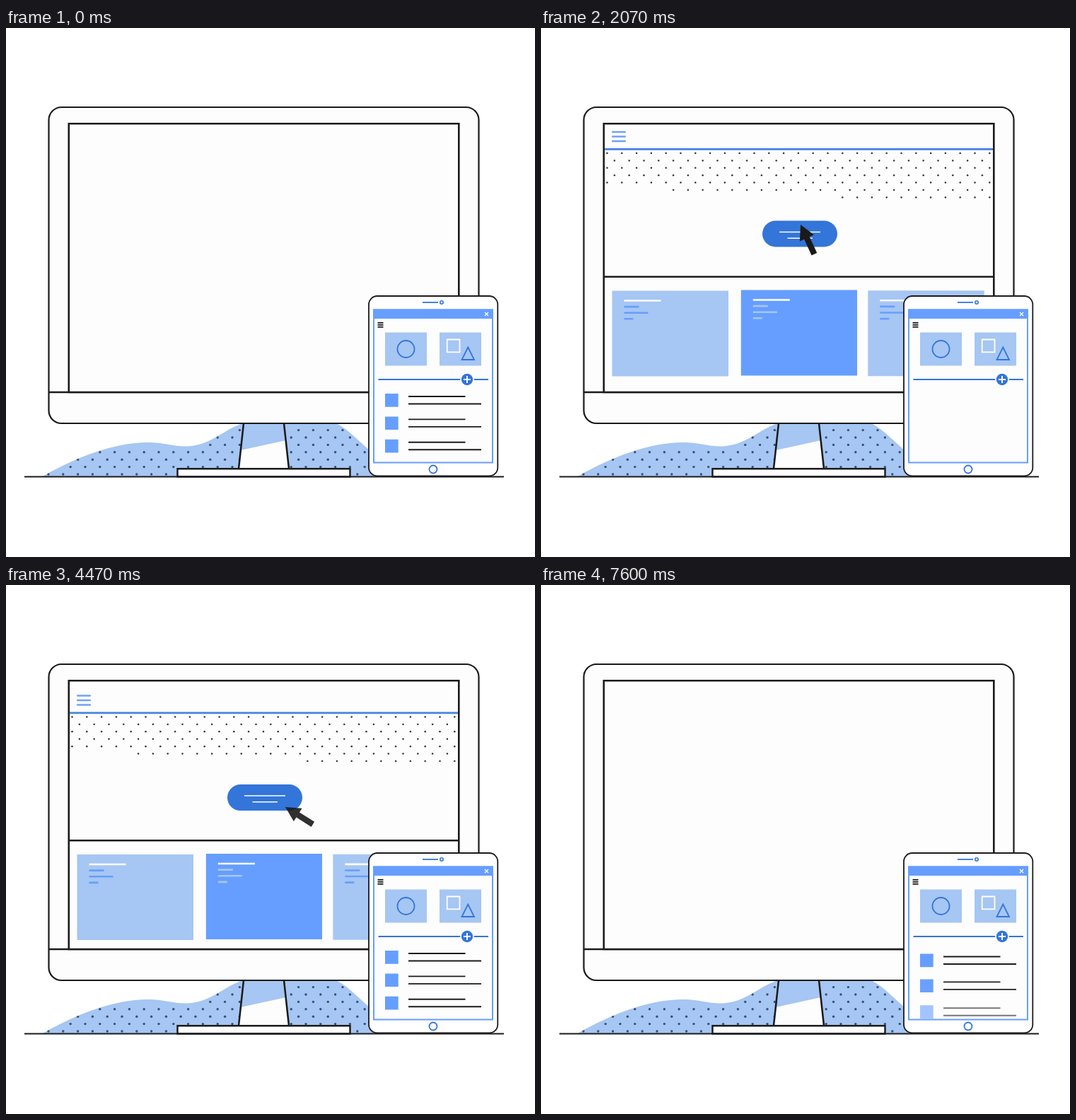
An HTML page with a canvas that plays this animation: 748 by 748 pixels, repeating every 7.66 s.

```html
<!DOCTYPE html>
<html lang="en">
<head>
<meta charset="utf-8">
<title>Desktop and tablet</title>
<style>
html, body { margin: 0; height: 100%; overflow: hidden; background: #fff; }
canvas { display: block; width: 748px; height: 748px; }
</style>
</head>
<body>
<canvas width="748" height="748"></canvas>
<script>
const ctx = document.querySelector('canvas').getContext('2d');
const LOOP = 7660, HALF = 3870;
const INK = '#1a1a1a', BLUE = '#669eff', PALE = '#a6c6f3', DEEP = '#3375d9', PAPER = '#fdfdfd';

const clamp = v => Math.min(1, Math.max(0, v));
const ramp = (t, from, to) => clamp((t - from) / (to - from));
const backOut = p => 1 + 2.70158 * (p - 1) ** 3 + 1.70158 * (p - 1) ** 2;

function paint(path, fill, stroke, width = 2) {
  if (fill) { ctx.fillStyle = fill; ctx.fill(path); }
  if (stroke) { ctx.strokeStyle = stroke; ctx.lineWidth = width; ctx.stroke(path); }
}
function box(x1, y1, x2, y2, fill, stroke, width, radius = 0) {
  const p = new Path2D();
  p.roundRect(x1, y1, x2 - x1, y2 - y1, radius);
  paint(p, fill, stroke, width);
}
function disc(x, y, r, fill, stroke, width) {
  const p = new Path2D();
  p.arc(x, y, r, 0, 7);
  paint(p, fill, stroke, width);
}
const shape = (d, fill, stroke, width) => paint(new Path2D(d), fill, stroke, width);
const rule = (x1, x2, y, color, width) => shape(`M${x1} ${y}H${x2}`, null, color, width);

function clipped(x1, y1, x2, y2, draw) {
  ctx.save();
  ctx.beginPath();
  ctx.rect(x1, y1, x2 - x1, y2 - y1);
  ctx.clip();
  draw();
  ctx.restore();
}

// Staggered dot grid; `keep` decides which dots belong to the pattern.
function dots(x0, y0, cols, rows, step, r, color, keep) {
  for (let row = 0; row < rows; row++)
    for (let col = 0; col < cols; col++) {
      const x = x0 + 20.8 * col + (row % 2) * 10.4, y = y0 + step * row;
      if (keep(x, y)) disc(x, y, r, color);
    }
}

function hill() {
  const p = new Path2D('M52 634C100 606 155 586 200 586C225 586 235 592 258 591.5C290 589 305 570 334 559H467C485 568 500 586 520 602V634Z');
  ctx.save();
  paint(p, PALE);
  ctx.clip(p);
  dots(60, 631, 22, 7, -10.4, 1.7, '#3c4f70', (x, y) => y > 595 || x > 285);
  ctx.restore();
}

function monitor() {
  shape('M336 559L329 623H400L393 559Z', PAPER);
  shape('M336 559L332 597L396 583L393 559Z', PALE);
  shape('M336 559L329 623M393 559L400 623', null, INK, 2.5);
  box(242.5, 623.3, 486.5, 634.5, PAPER, INK, 2.4);
  rule(26, 704, 634.5, INK, 2.2);
  box(60.5, 112, 668.5, 559, PAPER, INK, 2.2, 18);
  rule(60, 669, 515, INK, 2.5);
  box(88.8, 135.3, 640.3, 515, PAPER, INK, 2.6);
}

function card(x, y, width, fill, accent) {
  box(x, y, x + width, y + 121, fill);
  rule(x + 17, x + 69, y + 14, '#fff', 2.6);
  [21, 34, 13].forEach((w, i) => rule(x + 17, x + 17 + w, y + 22.6 + 8.6 * i, accent, 2.6));
}

function page(t) {
  const enter = ramp(t, 0, 250);
  const alpha = enter * (1 - ramp(t, 2200, 3040));
  if (!alpha && t > 3200) return;
  ctx.translate(0, 380 * (1 - ramp(t, 0, 850)) ** 3);
  ctx.globalAlpha = alpha;
  ctx.lineCap = 'round';
  [147, 153.5, 160].forEach(y => rule(101.3, 118.8, y, '#6fa2f4', 2.6));
  ctx.lineCap = 'butt';
  rule(90, 640, 171.3, '#4682e0', 2.8);
  dots(93.5, 177, 27, 7, 10.4, 1.25, '#333',
    (x, y) => y < 224 || (y < 234 ? x > 175 : x > 410));
  rule(90, 640, 351.7, INK, 2.6);
  card(100.5, 371.5, 164.5, PALE, BLUE);
  box(173, 381, 177, 418, PALE);
  card(282.8, 370.5, 164.2, BLUE, PALE);
  card(462.3, 371.3, 164.5, PALE, BLUE);
  ctx.globalAlpha = enter * (1 - ramp(t, 2220, 3170));
  box(313, 272.5, 419, 309.5, DEEP, null, 0, 18.5);
  ctx.globalAlpha = alpha;
  rule(337, 395, 288.5, '#fff', 1.5);
  rule(348.5, 384, 297.3, '#fff', 1.5);
}

// time, tip x, tip y, angle, opacity
const cursorKeys = [
  [400, 430, 350, -75, 0],
  [600, 395, 314, -58, .9],
  [950, 367, 278, -25, 1],
  [2150, 367, 278, -25, 1],
  [2460, 443, 257, -17.6, .78],
  [2750, 470, 250, -15, 0],
];
function cursor(t) {
  const i = cursorKeys.findIndex(k => k[0] > t);
  if (i < 1) return;
  const a = cursorKeys[i - 1], b = cursorKeys[i], p = ramp(t, a[0], b[0]);
  const [, x, y, angle, alpha] = a.map((v, n) => v + (b[n] - v) * p);
  ctx.save();
  ctx.translate(x, y);
  ctx.rotate(angle * Math.PI / 180);
  ctx.globalAlpha = alpha;
  shape('M0 0L11 21H4.2V46H-4.2V21H-11Z', INK);
  ctx.restore();
}

// Rows drop out downwards and return from above, the lowest one first.
const listMoves = [[1350, 'out'], [2130, 'in'], [4970, 'out'], [6064, 'in'], [7200, 'out']];
function rowState(t, order) {
  const move = listMoves.findLast(m => m[0] <= t);
  if (!move || (t >= HALF && move[0] < HALF)) return [0, 1];
  const leaving = move[1] === 'out';
  const p = clamp((t - move[0] - order * (leaving ? 80 : 70)) / 700);
  return leaving ? [38 * p * p, clamp((.75 - p) / .3)] : [38 * (backOut(p) - 1), clamp(p / .3)];
}

function tablet(t) {
  box(513, 379, 695.3, 633.5, '#fff', INK, 1.8, 12);
  rule(589, 611, 388, DEEP, 1.8);
  disc(616, 388, 2.2, null, DEEP, 1.6);
  box(520, 398.5, 688, 614.5, PAPER, BLUE, 2);
  box(519, 397.5, 689, 411, BLUE);
  shape('M677 402L682 407M682 402L677 407', null, '#fff', 1.3);
  [416.8, 419.8, 422.8].forEach(y => rule(525.5, 533.5, y, INK, 1.8));
  box(536, 430.5, 595, 477.5, PALE);
  box(613, 430.5, 672, 477.5, PALE);
  disc(565.5, 454, 12, null, DEEP, 1.8);
  box(623.7, 440.5, 641.5, 458.3, null, '#fff', 1.8);
  shape('M653.3 451.5L644.5 469H662Z', null, DEEP, 1.8);
  rule(526.5, 682, 497, DEEP, 2);
  disc(652, 497, 9.8, '#fff');
  disc(652, 497, 8.2, DEEP);
  shape('M647 497H657M652 492V502', null, '#fff', 1.9);
  disc(604, 624, 5.5, null, DEEP, 1.8);
  clipped(521, 508, 687, 613.5, () => {
    for (let i = 0; i < 3; i++) {
      const [shift, alpha] = rowState(t, 2 - i), y = 517 + 32.4 * i + shift;
      ctx.globalAlpha = alpha;
      box(536, y, 554.7, y + 18.7, BLUE);
      rule(569, 649.5, y + 4, INK, 1.9);
      rule(569, 672, y + 14.5, INK, 1.9);
    }
  });
}

function frame(now) {
  const t = now % LOOP, pass = t % HALF;
  ctx.fillStyle = '#fff';
  ctx.fillRect(0, 0, 748, 748);
  hill();
  monitor();
  clipped(90, 136.5, 639, 513.8, () => page(pass));
  cursor(pass);
  tablet(t);
}

const start = performance.now();
function tick() {
  frame(performance.now() - start);
  requestAnimationFrame(tick);
}
tick();
</script>
</body>
</html>
```
